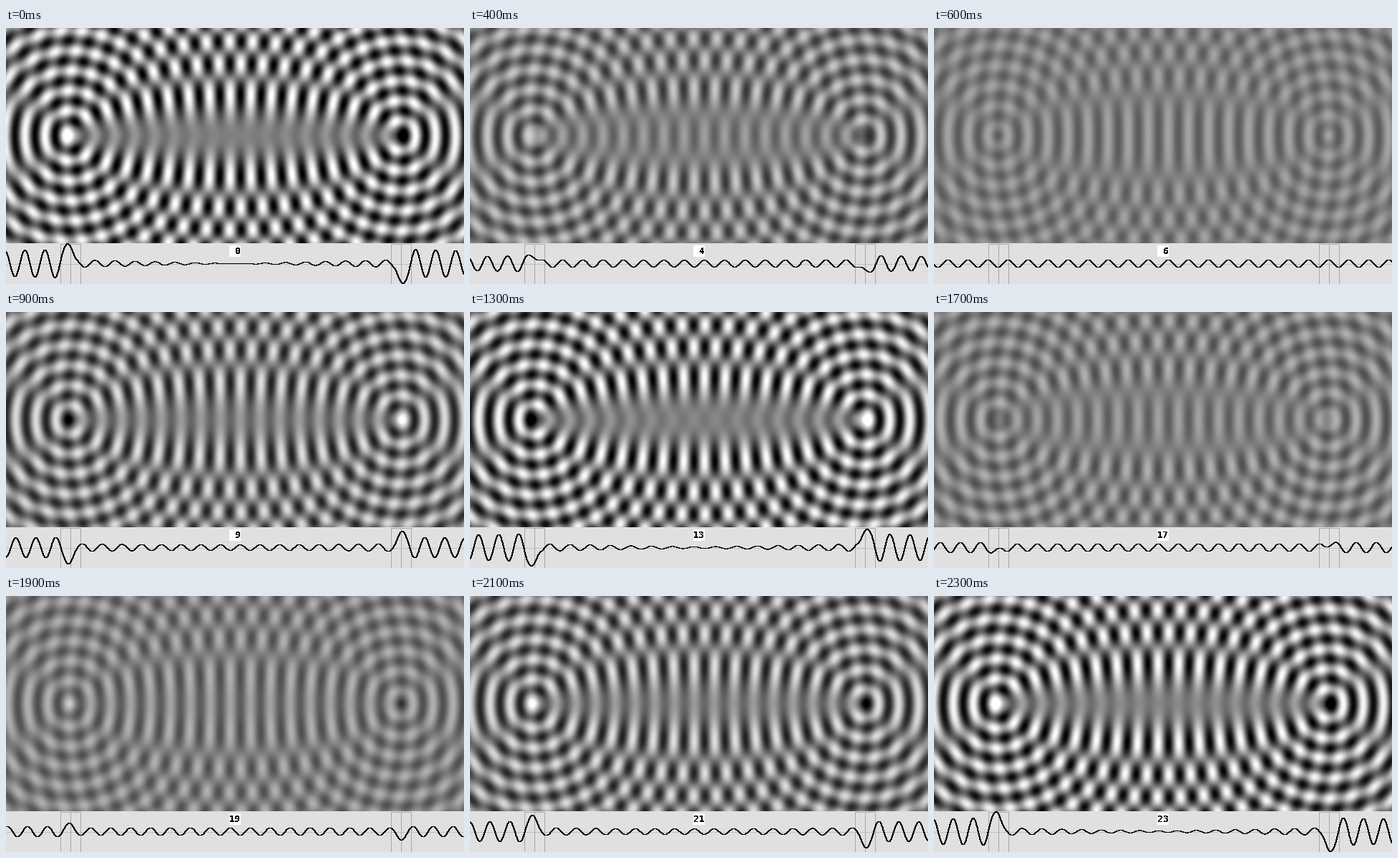
Recreate the animation shown at these times as a matplotlib script. Size 640 by 358 pixels, loop 2400 ms.

```python
import numpy as np
import matplotlib.pyplot as plt
from matplotlib.animation import FuncAnimation
from matplotlib.patches import Rectangle

W, H, FIELD_H = 640, 358, 301
FRAMES, INTERVAL = 24, 100
WAVE = 28
K = 2 * np.pi / WAVE
SOURCES = (89, 551)
MID_Y, AXIS_Y = 150, 329
PX = 0.72  # one pixel in points at 100 dpi


def standing(r):
    """Standing part of one source: a tall core, then a slowly fading sine."""
    x = np.maximum(K * r, 1e-6)
    tail = 12.8 - 0.0118 * r
    return np.sin(x) * (tail**6 + (25 / x) ** 6) ** (1 / 6)


def quadrature(r):
    return -2.75 * np.cos(K * r)


xs = np.arange(W)
gx, gy = np.meshgrid(xs, np.arange(FIELD_H))
r1, r2 = (np.hypot(gx - sx, gy - MID_Y) for sx in SOURCES)
in_phase = standing(r1) - standing(r2)
out_phase = quadrature(r1) - quadrature(r2)


def wave(n):
    t = 2 * np.pi * n / FRAMES
    return in_phase * np.cos(t) + out_phase * np.sin(t)


fig = plt.figure(figsize=(W / 100, H / 100), dpi=100, facecolor="#e0e0e0")
ax = fig.add_axes([0, 0, 1, 1])
ax.axis("off")

field = ax.imshow(np.zeros((FIELD_H, W)), cmap="gray", vmin=0, vmax=255,
                  extent=(0, W, FIELD_H, 0), interpolation="nearest",
                  aspect="auto")
ax.set(xlim=(0, W), ylim=(H, 0))


def line(x, y, color, z):
    return ax.plot(x, y, color=color, lw=PX, antialiased=False, zorder=z)[0]


line([0, W], [AXIS_Y + 0.5] * 2, "#c0c0c0", 2)
for sx in SOURCES:
    left, right = sx - WAVE / 2 + 0.5, sx + WAVE / 2 + 0.5
    top, bottom = FIELD_H + 0.5, H - 0.5
    line([left, right, right, left, left],
         [top, top, bottom, bottom, top], "#a8a8a8", 3)
    line([sx + 0.5] * 2, [top, bottom], "#a8a8a8", 3)

curve = line(xs + 0.5, np.full(W, AXIS_Y + 0.5), "black", 4)
ax.add_patch(Rectangle((312, 304), 16, 16, fc="white", ec="none", zorder=5))
label = ax.text(312, 316, "", family="DejaVu Sans Mono", weight="bold",
                size=13.3 * PX, color="black", ha="left", va="baseline",
                zorder=6, antialiased=False)


def draw(n):
    f = wave(n)
    field.set_data(np.clip(127.5 + 6.5 * f, 0, 255))
    y = np.clip(np.round(AXIS_Y - f[MID_Y]), FIELD_H, H - 1)
    curve.set_ydata(y + 0.5)
    label.set_text(f"{n:2d}")
    return field, curve, label


anim = FuncAnimation(fig, draw, frames=FRAMES, interval=INTERVAL,
                     repeat=True, repeat_delay=0, blit=False)
plt.show()
```
